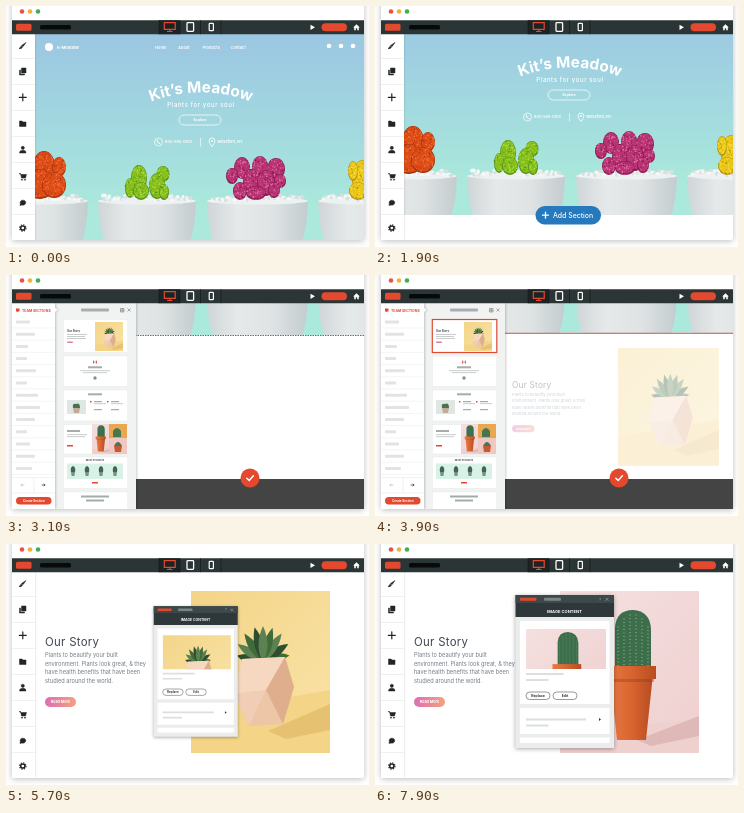
An HTML page for the animation above (8 s loop, 363 by 241 pixels).

```html
<!DOCTYPE html>
<html lang="en">
<head>
<meta charset="utf-8">
<title>Website builder</title>
<style>
html, body { margin: 0; width: 100%; height: 100%; overflow: hidden; background: #fff; }
svg { display: block; }
#stage { width: 100vw; height: 100vh; }
text { font-family: Inter, "Open Sans", sans-serif; }
.mid { text-anchor: middle; }
.bold { font-weight: 700; }
.line { fill: none; stroke-linecap: round; stroke-linejoin: round; }
</style>
</head>
<body>
<svg id="stage" viewBox="0 0 363 241">
<defs>
  <linearGradient id="sky" x2="0" y2="1">
    <stop stop-color="#9bc6e2"/><stop offset=".5" stop-color="#a3dadf"/><stop offset=".85" stop-color="#aae9db"/>
  </linearGradient>
  <linearGradient id="glaze">
    <stop stop-color="#cfd6d8"/><stop offset=".3" stop-color="#e6e9ea"/><stop offset=".65" stop-color="#dfe3e4"/><stop offset="1" stop-color="#c3cccf"/>
  </linearGradient>
  <linearGradient id="rose"><stop stop-color="#dd6fb4"/><stop offset="1" stop-color="#f3a27c"/></linearGradient>
  <linearGradient id="sun" x2="1" y2="1"><stop stop-color="#f3d588"/><stop offset="1" stop-color="#fae3a8"/></linearGradient>
  <linearGradient id="blush" x2="1" y2="1"><stop stop-color="#f5e1e0"/><stop offset="1" stop-color="#efcfd0"/></linearGradient>
  <linearGradient id="clay"><stop stop-color="#e67a45"/><stop offset=".5" stop-color="#d9642f"/><stop offset="1" stop-color="#b64d22"/></linearGradient>
  <clipPath id="pageClip"><path d="M29 28H358V234H29Z"/></clipPath>
  <clipPath id="windowClip"><path d="M6 28H358V234H6Z"/></clipPath>
  <path id="arc" d="M133 101A139 139 0 0 1 257 101"/>

  <g id="photoA">
    <path fill="url(#sun)" d="M185 47H324V209H185Z"/>
    <path fill="#f4d487" d="M185 170L324 146V209H185Z"/>
    <path fill="#dfb665" opacity=".6" d="M262 187L324 160V186L280 195Z"/>
    <g id="leaves"></g>
    <path fill="#edc5a7" d="M236 115L279 113L288 143L277 180L243 182L228 150Z"/>
    <path fill="#f6d8c1" d="M236 115L279 113L260 146L228 150Z"/>
    <path fill="#dfae8c" d="M279 113L288 143L277 180L260 146Z"/>
    <path fill="#f0cdb4" d="M228 150L260 146L243 182Z"/>
  </g>
  <g id="photoB">
    <path fill="url(#blush)" d="M185 47H324V209H185Z"/>
    <path fill="#eed0cf" d="M185 186L324 176V209H185Z"/>
    <path fill="#d6aaa8" opacity=".6" d="M262 196L324 172V192L276 202Z"/>
    <path fill="#3c6e4b" d="M240 124V84Q241 66 258 66Q275 67 276 85V124Z"/>
    <g id="ribs"></g>
    <path fill="url(#clay)" d="M235 130H278L271 196H242Z"/>
    <path fill="url(#clay)" d="M231 122H281V135H231Z"/>
    <path fill="#8c3b1c" opacity=".35" d="M234 135H279V138H234Z"/>
  </g>
  <g id="photos"><use href="#photoA"/><use id="swap" href="#photoB"/></g>
</defs>

<rect width="363" height="241" fill="#fff"/>
<rect x="6" y="-8" width="352" height="242" rx="2" fill="#fff" style="filter:drop-shadow(0 1px 3px #0004)"/>

<g clip-path="url(#pageClip)">
  <g id="hero"><g clip-path="url(#pageClip)">
    <path fill="url(#sky)" d="M29 28H358V234H29Z"/>
    <g id="plants"></g>
    <g fill="#fff">
      <circle cx="43" cy="41" r="4"/>
      <text x="51" y="42.5" font-size="4.1" class="bold">K-Meadow</text>
      <g id="nav" font-size="4"></g>
      <circle cx="323" cy="40" r="2.3"/><circle cx="335" cy="40" r="2.3"/><circle cx="347" cy="40" r="2.3"/>
      <text class="mid bold" font-size="15.4"><textPath href="#arc" startOffset="50%">Kit’s Meadow</textPath></text>
      <text x="195" y="101" class="mid" font-size="5.9" letter-spacing=".65" font-weight="500">Plants for your soul</text>
      <rect x="173" y="109" width="42" height="10" rx="5" fill="none" stroke="#fff" stroke-width=".7"/>
      <text x="194" y="115.4" class="mid bold" font-size="3.6">Explore</text>
      <circle cx="152.5" cy="136" r="4" fill="none" stroke="#fff" stroke-width=".7"/>
      <path class="line" stroke="#fff" d="M151 134q.3 3 3 4"/>
      <text x="159" y="137.4" font-size="3.8" font-weight="600">800-555-0100</text>
      <path stroke="#fff" stroke-width=".6" d="M194.5 132V140.5"/>
      <path fill="none" stroke="#fff" stroke-width=".8" d="M206 140.5q-3-3.5-3-5.5a3 3 0 0 1 6 0q0 2-3 5.5Z"/>
      <circle cx="206" cy="135" r="1"/>
      <text x="211.5" y="137.4" font-size="3.8" font-weight="600">Mossford, NY</text>
    </g>
  </g>
  <path id="dots" stroke="#d8402c" stroke-width="1" stroke-dasharray="1.5 1" d="M29 234.5H358"/>
  <path id="solid" stroke="#d8402c" stroke-width="1.2" d="M29 234.6H358"/>
  </g>

  <path id="footer" fill="#444" d="M29 204H358V236H29Z"/>

  <g id="story">
    <text x="39" y="101.5" font-size="11.4" letter-spacing=".3" fill="#3c4651">Our Story</text>
    <g id="copy" font-size="5.65" fill="#737c88"></g>
    <rect x="39" y="153" width="31" height="10" rx="5" fill="url(#rose)"/>
    <text x="54.5" y="159.4" class="mid bold" font-size="3.7" fill="#fff">Read More</text>
    <use href="#photos"/>
  </g>

  <g id="check">
    <circle cx="244" cy="203" r="9.5" fill="#e4492f"/>
    <path class="line" stroke="#fff" stroke-width="1.5" d="M240.8 203.2L243.2 205.4L247.4 200.7"/>
  </g>
  <g id="add">
    <rect x="160.5" y="200" width="65.5" height="18.5" rx="9.25" fill="#2779bd"/>
    <path class="line" stroke="#fff" stroke-width="1.3" d="M167.5 209.2H173.5M170.5 206.2V212.2"/>
    <text x="178" y="211.6" font-size="6.9" font-weight="500" fill="#fff">Add Section</text>
  </g>
</g>

<g clip-path="url(#windowClip)">
  <path fill="#fff" d="M6 28H29V234H6Z" style="filter:drop-shadow(0 0 1px #0003)"/>
  <path id="rules" stroke="#ececec" stroke-width=".8" d="M6 52.5H29M6 78.5H29M6 104.5H29M6 130.5H29M6 156.5H29M6 182.5H29M6 208.5H29"/>
  <g fill="#202526" stroke="#202526" stroke-width=".5">
    <path d="M20 36.5L17 40.7L15.5 39.5ZM15.2 40L16.4 41.2Q15.5 43.3 13 42.6Q14.2 41.8 15.2 40Z"/>
    <path d="M15.5 62H20V67H15.5ZM13.5 64H14.5V68H18.5V69H13.5Z"/>
    <path class="line" stroke-width="1.2" d="M13.3 91.3H20.3M16.8 87.8V94.8"/>
    <path d="M13.5 115H16L17 116H20V120.5H13.5Z"/>
    <circle cx="16.8" cy="141.8" r="1.6"/><path d="M13.5 147Q13.5 144.2 16.8 144.2T20 147Z"/>
    <path d="M13 167.5H14.5L15.5 172H19.5L20.5 168.5H15Z"/><circle cx="16" cy="173.7" r=".6"/><circle cx="19" cy="173.7" r=".6"/>
    <path d="M14 199.5L14.3 197.5A2.8 2.5 0 1 1 16 199Z"/>
    <circle cx="16.8" cy="222" r="2.1" fill="none" stroke-width="1.5"/>
    <circle cx="16.8" cy="222" r="3.2" fill="none" stroke-width="1.1" stroke-dasharray="1.25 1.263"/>
  </g>

  <g id="gallery">
    <path fill="#f1f2f2" d="M49 28H130V234H49Z" style="filter:drop-shadow(1px 0 1px #0003)"/>
    <rect x="75" y="33.5" width="28" height="3" rx="1" fill="#a9adae"/>
    <path fill="none" stroke="#777" stroke-width=".6" d="M114.5 33.5H118V37H114.5ZM116.25 33.5V37M114.5 35.25H118M121.5 33.5L124.5 36.5M124.5 33.5L121.5 36.5"/>
    <g id="cards" fill="#fff"></g>
    <text x="61" y="57" font-size="2.8" class="bold" fill="#444">Our Story</text>
    <rect x="61" y="66.5" width="6" height="1.6" rx=".8" fill="#e27ba0"/>
    <svg x="89" y="47" width="28" height="29" viewBox="185 47 139 162" preserveAspectRatio="xMidYMid slice"><use href="#photoA"/></svg>
    <path class="line" stroke="#e4492f" stroke-width="1.2" d="M87.7 86v2M90.3 86v2"/>
    <circle cx="89" cy="103" r="1.7" fill="#7e9387"/>
    <path fill="#dfe7e2" d="M61 125H80V139H61Z"/>
    <path fill="#4b7250" d="M67 133Q66 128 70 129Q74 127 74 133Z"/><path fill="#c4ab98" d="M67 133H74L73 138H68Z"/>
    <svg x="86" y="149" width="17" height="30" viewBox="210 60 90 149" preserveAspectRatio="xMidYMid slice"><use href="#photoB"/></svg>
    <path fill="#e9a84f" d="M103 149H121V163H103Z"/><path fill="#f0c8c2" d="M103 163H121V179H103Z"/>
    <path fill="#477650" d="M107 162V156Q111 150 115 156V162ZM108 171Q112 163 116 171Z"/>
    <path fill="#c55b36" d="M108 171H116L115 177H109Z"/>
    <text x="89" y="186.2" class="mid bold" font-size="2.6" fill="#555">Most Products</text>
    <path fill="#d8f2e7" d="M61 188.5H117V204H61Z"/>
    <g id="minis"></g>
    <g id="bars" fill="#a6abac"></g>
    <path fill="#e4492f" d="M86 207h6v1.4h-6ZM61 170h6v1.4h-6ZM84 126h1.5v1.5h-1.5ZM101 126h1.5v1.5h-1.5Z"/>
    <rect id="picked" x="57.3" y="44.5" width="64.5" height="33" fill="none" stroke="#df4a34" stroke-width="1.2"/>
  </g>

  <g id="panel">
    <path fill="#fff" d="M6 28H49V33L51.5 35L49 37V234H6Z" style="filter:drop-shadow(1px 0 1px #0003)"/>
    <path fill="#e4492f" d="M10 33.5H13.5V36.5H12L11 37.5V36.5H10Z"/>
    <text x="16" y="36.7" font-size="3.45" class="bold" fill="#e4492f">TEAM SECTIONS</text>
    <g id="rows"></g>
    <path stroke="#e7e7e7" stroke-width=".6" d="M6 202.5H49M6 218H49M28 202.5V218"/>
    <path class="line" stroke="#bbb" stroke-width=".7" d="M18 210H15M16 209L15 210L16 211"/>
    <path class="line" stroke="#333" stroke-width=".7" d="M36 210H39M38 209L39 210L38 211"/>
    <rect x="10" y="222" width="35.5" height="7.5" rx="3.75" fill="#e4492f"/>
    <text x="27.7" y="226.8" class="mid bold" font-size="3" fill="#fff">Create Section</text>
  </g>
</g>

<g id="popup" style="filter:drop-shadow(0 1px 2px #0005)">
  <path fill="#ebecec" d="M140.5 51H239V204H140.5Z"/>
  <path fill="#2e383b" d="M140.5 51H239V73H140.5Z"/>
  <path fill="#3d484b" d="M140.5 51H239V59H140.5Z"/>
  <rect x="145" y="53.7" width="16.5" height="3" rx="1" fill="#e4492f"/>
  <rect x="169" y="53.7" width="17" height="3" rx="1" fill="#7d8587"/>
  <text x="224" y="56.8" font-size="4" fill="#aab">?</text>
  <path stroke="#aab" stroke-width=".6" d="M230.5 53.8L233.5 56.8M233.5 53.8L230.5 56.8"/>
  <text x="189.5" y="68.5" class="mid bold" font-size="4.1" fill="#fff">IMAGE CONTENT</text>
  <path fill="#fff" d="M145 77H234.5V160H145ZM145 164H234.5V190H145ZM145 193.5H234.5V199H145Z"/>
  <svg x="151" y="85" width="80" height="40" viewBox="185 61 139 69.5"><use href="#photos"/></svg>
  <path stroke="#dcdedf" stroke-width="2" d="M151 130H188.5M151 136H173.5M151 175.5H211M151 181.5H173.5"/>
  <g fill="#fff" stroke="#555" stroke-width=".6">
    <rect x="151" y="148" width="24" height="7.5" rx="3.75"/><rect x="178" y="148" width="24" height="7.5" rx="3.75"/>
  </g>
  <g class="mid bold" font-size="3.5" fill="#333"><text x="163" y="153">Replace</text><text x="190" y="153">Edit</text></g>
  <path fill="#333" d="M224 174L226 175.5L224 177Z"/>
</g>

<path fill="#fff" d="M6 0H358V14H6Z"/>
<circle cx="16" cy="5.5" r="2.3" fill="#e65349"/><circle cx="24" cy="5.5" r="2.3" fill="#f0b138"/><circle cx="32" cy="5.5" r="2.3" fill="#3fae55"/>
<path fill="#2b3536" d="M6 14.3H358V28.2H6Z"/>
<path fill="#1c2324" d="M153 14.3H174V28.2H153Z"/>
<path stroke="#151a1b" stroke-width=".7" d="M153 14.3V28.2M174 14.3V28.2M194.5 14.3V28.2M215 14.3V28.2"/>
<rect x="10" y="17.7" width="15.5" height="7" rx="1.5" fill="#e4492f"/>
<rect x="34" y="19" width="31" height="4.5" rx="1.5" fill="#070a0a"/>
<path fill="none" stroke="#e4492f" stroke-width="1.2" d="M158.3 16.7H169.2V23.3H158.3ZM163.75 23.3V25.5M161 25.5H166.5"/>
<rect x="181" y="16.6" width="6.6" height="8.8" rx=".8" fill="none" stroke="#fff" stroke-width="1.3"/>
<rect x="203.2" y="17.3" width="4.2" height="7.4" rx=".8" fill="none" stroke="#fff" stroke-width="1.2"/>
<path fill="#fff" d="M304.5 18.7L309 21.3L304.5 24ZM347.2 21.5L350.5 18.3L353.8 21.5H352.8V24.3H351.2V22.3H349.8V24.3H348.2V21.5Z"/>
<rect x="315.5" y="17.3" width="25.5" height="8" rx="4" fill="#e4492f"/>
</svg>

<script>
const $ = id => document.getElementById(id);
const fill = (id, list, draw) => $(id).innerHTML = list.map(draw).join('');

let seed = 7;
const rnd = () => (seed = seed * 16807 % 2147483647) / 2147483647;
const times = (n, draw) => Array.from({ length: n }, (_, i) => draw(i)).join('');

// A spiny lobe: a shaded edge, a lighter body and fine tufts scattered inside.
const lobe = ([dark, mid, light], [x, y, rx, ry]) =>
  `<ellipse cx="${x}" cy="${y}" rx="${rx}" ry="${ry}" fill="${dark}"/>
  <ellipse cx="${x}" cy="${y - .6}" rx="${rx - .7}" ry="${ry - 1}" fill="${mid}"/>` +
  times(Math.round(rx * ry / 1.5), i => {
    const a = rnd() * 2 * Math.PI, d = Math.sqrt(rnd()) * .95;
    return `<circle cx="${x + rx * d * Math.cos(a)}" cy="${y + ry * d * Math.sin(a)}" r="${.3 + rnd() * .5}" fill="${i % 3 ? light : dark}"/>`;
  });

const pot = (x, w) =>
  `<path fill="url(#glaze)" d="M${x} 195Q${x + 1} 225 ${x + 8} 240H${x + w - 8}Q${x + w - 1} 225 ${x + w} 195Z"/>
  <ellipse cx="${x + w / 2}" cy="195" rx="${w / 2}" ry="3.5" fill="#eef1f1"/>` +
  times(50, i => `<ellipse cx="${x + 6 + i * (w - 12) / 49}" cy="${189.5 + rnd() * 5}" rx="${1.4 + rnd() * 1.6}" ry="${1.2 + rnd()}" fill="${['#f7f8f8', '#d9dfe0', '#eceff0'][i % 3]}"/>`);

// Pot left edge and width, cactus colours, lobes from back to front
fill('plants', [
  [-18, 100, ['#a5330f', '#dd4b17', '#f47a35'], [[38, 160, 11, 15], [34, 178, 15, 15], [53, 161, 7, 10], [48, 179, 12, 13]]],
  [92, 98, ['#55901a', '#86bf1c', '#b2de45'], [[133, 172, 8, 13], [157, 168, 6.5, 8], [124, 182, 5, 10], [151, 180, 8, 13], [135, 185, 8, 9], [158, 186, 5, 8]]],
  [201, 101, ['#87194f', '#b93273', '#de74a5'], [[254, 161, 8, 11], [236, 162, 8, 11], [270, 163, 9, 11], [226, 170, 6, 8], [274, 175, 6, 7], [245, 176, 8, 13], [260, 177, 9, 13], [234, 185, 7, 9], [268, 184, 6, 8], [250, 187, 10, 7]]],
  [312, 100, ['#b98d0c', '#e8c715', '#f7e050'], [[357, 172, 11, 18], [347, 165, 5, 10], [352, 185, 9, 9]]]
], ([x, w, colors, lobes]) => pot(x, w) + lobes.map(l => lobe(colors, l)).join(''));

fill('nav', [[149, 'Home'], [172, 'About'], [196.5, 'Products'], [224.5, 'Contact']],
  ([x, s]) => `<text x="${x}" y="42.5" font-weight="600">${s}</text>`);

fill('copy', ['Plants to beautify your built', 'environment. Plants look great, &amp; they', 'have health benefits that have been', 'studied around the world.'],
  (s, i) => `<text x="39" y="${113 + i * 8.7}">${s}</text>`);

fill('leaves', [-78, 78, -56, 56, -34, 34, -14, 16, 0], (a, i) => {
  const len = 26 + 10 * Math.cos(a / 57);
  return `<path transform="rotate(${a} 257 117)" fill="${['#2d4f2f', '#426b3b', '#5b8250'][i % 3]}" d="M257 118q-9-16 0-${len}q9 20 0 ${len}"/>`;
});

fill('ribs', [243, 249, 255, 261, 267, 273], x =>
  `<path stroke="#8fb08a" stroke-width="1.2" stroke-dasharray="1 2.5" d="M${x} ${70 + (x - 258) ** 2 / 18}V122"/>`);

fill('cards', [[44.5, 33], [81, 30.5], [115, 31], [149.5, 29.5], [182, 31.5], [217, 20]],
  ([y, h]) => `<rect x="57.3" y="${y}" width="64.5" height="${h}" stroke="#e2e4e4" stroke-width=".4"/>`);

fill('minis', [67, 81, 95, 109], x =>
  `<path fill="#3c6850" d="M${x - 2} 197q-1-5 2-6q3 1 2 6Z"/><path fill="#7b8f86" d="M${x - 2} 197h4l-.6 4h-2.8Z"/>`);

// Placeholder text: x, y, width, height
fill('bars', [
  [61, 59, 20, .6], [61, 61, 18, .6], [61, 63, 19, .6],
  [82, 91.3, 14, 2], [74, 95.5, 30, .6], [77, 97.5, 24, .6],
  [82, 118.3, 14, 2], [88, 126, 8, 1.2], [105, 126, 8, 1.2], [88, 128.5, 12, .6], [105, 128.5, 12, .6],
  [88, 134, 8, 1.2], [105, 134, 8, 1.2],
  [61, 155, 13, 2], [61, 159.5, 20, .6], [61, 161.5, 18, .6],
  [75, 220.5, 28, 2], [80, 224.5, 18, 2]
], ([x, y, w, h]) => `<rect x="${x}" y="${y}" width="${w}" height="${h}"/>`);

fill('rows', [14, 19, 12, 11, 20, 11, 22, 24, 19, 11, 14, 19, 16], (w, i) => {
  const y = 45.5 + i * 12.2;
  return `<rect x="10" y="${y}" width="${w}" height="3" rx=".8" fill="#e2e3e3"/><path stroke="#ececec" stroke-width=".6" d="M6 ${y + 7.5}H49"/>`;
});

const seg = (t, a, b) => Math.min(1, Math.max(0, (t - a) / (b - a)));
const inOut = p => p < .5 ? 4 * p ** 3 : 1 - 4 * (1 - p) ** 3;
const out = p => 1 - (1 - p) ** 3;
const mix = (a, b, p) => a + (b - a) * p;
const move = (id, x, y = 0, k = 1) => $(id).setAttribute('transform', `translate(${x} ${y}) scale(${k})`);
const fade = (id, o) => $(id).setAttribute('opacity', o);
const zoom = (id, x, y, k) => move(id, x * (1 - k), y * (1 - k), k);

function draw(t) {
  const grow = inOut(seg(t, 4700, 5400));

  move('hero', 0, -25 * inOut(seg(t, 100, 900)) - 149 * inOut(seg(t, 2000, 3000)) - 3 * seg(t, 3600, 4000) - 45 * grow);
  fade('dots', seg(t, 2600, 2900) * (1 - seg(t, 3700, 4000)));
  fade('solid', seg(t, 3700, 4000));

  fade('add', seg(t, 500, 800) * (1 - seg(t, 1950, 2150)));
  zoom('add', 193.2, 209, mix(.7, 1, out(seg(t, 500, 850))));

  const arrive = seg(t, 2300, 2640);
  fade('footer', arrive);
  move('footer', 0, 34 * grow);
  fade('check', arrive * (1 - seg(t, 4800, 5050)));
  move('check', 0, 34 * grow);

  move('panel', -48 * (1 - out(seg(t, 2050, 2630)) + inOut(seg(t, 4880, 5300))));
  move('gallery', -84 * (1 - out(seg(t, 2650, 3050)) + inOut(seg(t, 4600, 4970))));
  fade('gallery', t > 2650 && t < 4970 ? 1 : 0);
  fade('picked', seg(t, 3450, 3600));

  fade('story', seg(t, 3750, 4200));
  move('story', mix(108.7, 0, grow), mix(38.9, 0, grow), mix(.726, 1, grow));

  fade('popup', seg(t, 5500, 5640));
  zoom('popup', 189.7, 127.5, mix(.7, 1, inOut(seg(t, 5550, 5850))));
  fade('swap', seg(t, 6800, 7050));
}

const start = performance.now();
(function tick() {
  draw((performance.now() - start) % 8000);
  requestAnimationFrame(tick);
})();
</script>
</body>
</html>
```
